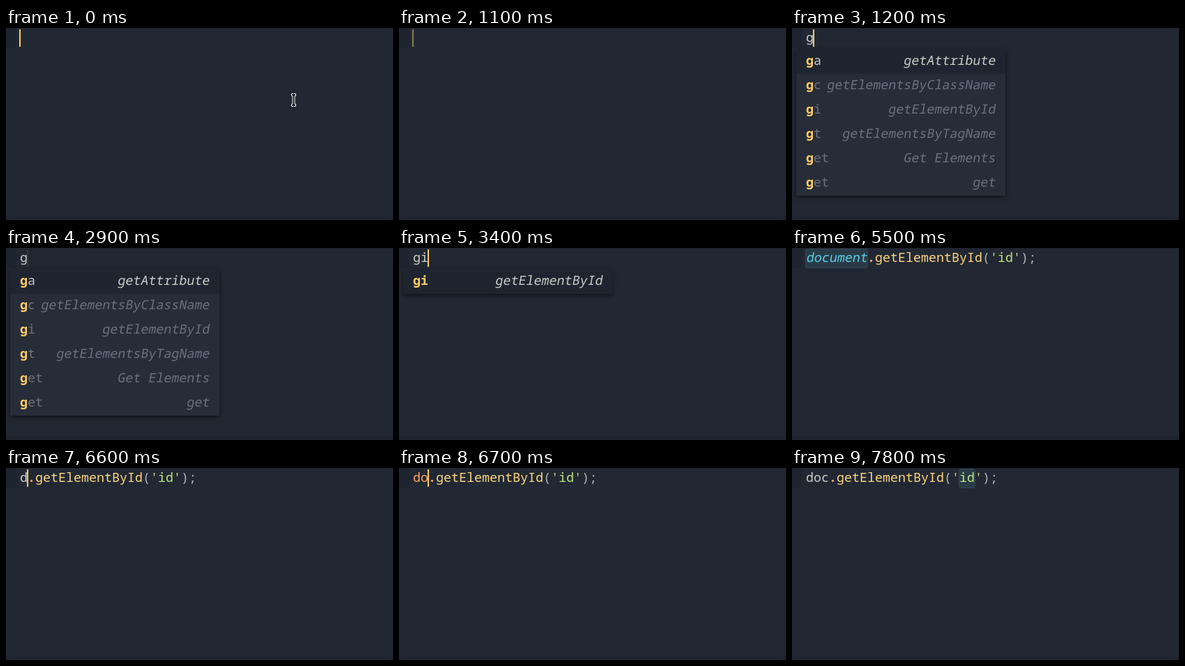
An HTML page for the animation above (8 s loop, 555 by 276 pixels).

```html
<!DOCTYPE html>
<html lang="en">
<head>
<meta charset="utf-8">
<title>Snippet completion</title>
<style>
  html, body { margin: 0; width: 100%; height: 100%; overflow: hidden; background: #222833; }
  svg { display: block; }
  text { font: 18.333px "Noto Sans Mono", monospace; fill: #cbccc6; white-space: pre; }
  .obj { fill: #5ccfe6; }
  .dot { fill: #f29e74; font-weight: 700; }
  .fn { fill: #ffd580; }
  .str { fill: #bae67e; }
  .kw { fill: #ffa759; }
  .punct { fill: #b2b5b4; }
  .hit { fill: #ffcc66; font-weight: 700; }
  .hint { text-anchor: end; }
  .dim { fill: #697180; }
  .popup { filter: drop-shadow(0 2px 3px rgba(10, 13, 19, .85)); }
</style>
</head>
<body>
<svg id="stage" width="555" height="276" viewBox="0 0 555 276">
  <rect width="555" height="276" fill="#222833"/>
  <rect width="15" height="28" fill="#1e242f"/>
  <rect x="113" width="442" height="1" fill="#1b202a"/>
  <rect y="271" width="555" height="5" fill="#1e232e"/>
  <g id="scenes"></g>
  <rect id="caret" y="2" width="2" height="25" fill="#ffcc66"/>
  <path id="mouse" d="M409.5 94.5h2.500l.5 .5 .5-.5h2.500v3h-1.500v12h1.500v3h-2.500l-.5-.5-.5 .5h-2.500v-3h1.500v-12h-1.500z"
        fill="#10141b" stroke="#fff"/>
</svg>
<script>
const LOOP = 8000, CHAR = 11, LEFT = 20, SLANT = -10;
const $ = id => document.getElementById(id);

function add(parent, tag, attrs = {}, content = '') {
  const el = document.createElementNS('http://www.w3.org/2000/svg', tag);
  for (const key in attrs) el.setAttribute(key, attrs[key]);
  el.textContent = content;
  return parent.appendChild(el);
}

// A gentler slope than the browser's own synthetic italic
function addItalic(parent, x, y, str, cls) {
  add(parent, 'text', { class: cls, transform: `translate(${x} ${y}) skewX(${SLANT})` }, str);
}

function addText(parent, x, y, tokens) {
  for (const [str, cls = ''] of tokens) {
    if (cls === 'obj') addItalic(parent, x, y, str, cls);
    else add(parent, 'text', { x, y, class: cls }, str);
    x += str.length * CHAR;
  }
}

function addPopup(parent, typed, rows) {
  const box = add(parent, 'g', { class: 'popup' });
  add(box, 'rect', { x: 6, y: 30, width: 300, height: 1 + rows.length * 35, fill: '#272d38' });
  add(box, 'rect', { x: 6, y: 30, width: 300, height: 36, fill: '#1f2530' });
  rows.forEach(([key, hint], i) => {
    const y = 53 + i * 35, tone = i ? 'dim' : '';
    addText(parent, LEFT, y, [[typed, 'hit'], [key.slice(typed.length), tone]]);
    addItalic(parent, 291.5, y, hint, 'hint ' + tone);
  });
}

const call = [['.', 'dot'], ['getElementById', 'fn'], ['(', 'punct'], ["'id'", 'str'], [');', 'punct']];
const byId = ['gi', 'getElementById'];
const all = [
  ['ga', 'getAttribute'], ['gc', 'getElementsByClassName'], byId,
  ['gt', 'getElementsByTagName'], ['get', 'Get Elements'], ['get', 'get']
];

// caret is a column; select is [first column, length]
const scenes = [
  { at: 0, caret: 0, code: [] },
  { at: 1200, caret: 1, code: [['g']], popup: all },
  { at: 3400, caret: 2, code: [['gi']], popup: [byId] },
  { at: 4900, caret: 8, code: [['document', 'obj'], ...call], select: [0, 8] },
  { at: 6600, caret: 1, code: [['d'], ...call] },
  { at: 6700, caret: 2, code: [['do', 'kw'], ...call] },
  { at: 6900, caret: 3, code: [['doc'], ...call] },
  { at: 7200, caret: 22, code: [['doc'], ...call], select: [20, 2] }
];

for (const s of scenes) {
  s.el = add($('scenes'), 'g');
  if (s.select) {
    const [col, len] = s.select;
    add(s.el, 'rect', {
      x: LEFT + col * CHAR - .5, y: 1.5, width: len * CHAR + 1, height: 27, rx: 2.5,
      fill: '#293b48', stroke: '#314452'
    });
  }
  addText(s.el, LEFT, 20, s.code);
  if (s.popup) addPopup(s.el, s.code[0][0], s.popup);
}

// [time, caret opacity]
const blink = [
  [0, 1], [400, .5], [500, .08], [1100, .5], [1200, 1], [1600, .5], [1700, .08],
  [2300, .5], [2400, 1], [2800, .5], [2900, .08], [3400, 1], [3800, .5], [3900, .08],
  [4000, .5], [4100, 1], [4500, .67], [4600, .33], [4700, 0], [4900, 1],
  [5300, .67], [5400, .33], [5500, 0], [6100, .5], [6200, 1],
  [7600, .67], [7700, .33], [7800, 0]
];

function draw(t) {
  const now = scenes.findLast(s => s.at <= t);
  for (const s of scenes) s.el.style.display = s === now ? '' : 'none';
  $('caret').setAttribute('x', LEFT - 1 + now.caret * CHAR);
  $('caret').style.opacity = blink.findLast(b => b[0] <= t)[1];
  $('mouse').style.display = t < 200 ? '' : 'none';
}

const start = performance.now();
function tick() {
  draw((performance.now() - start) % LOOP);
  requestAnimationFrame(tick);
}
tick();
</script>
</body>
</html>
```
